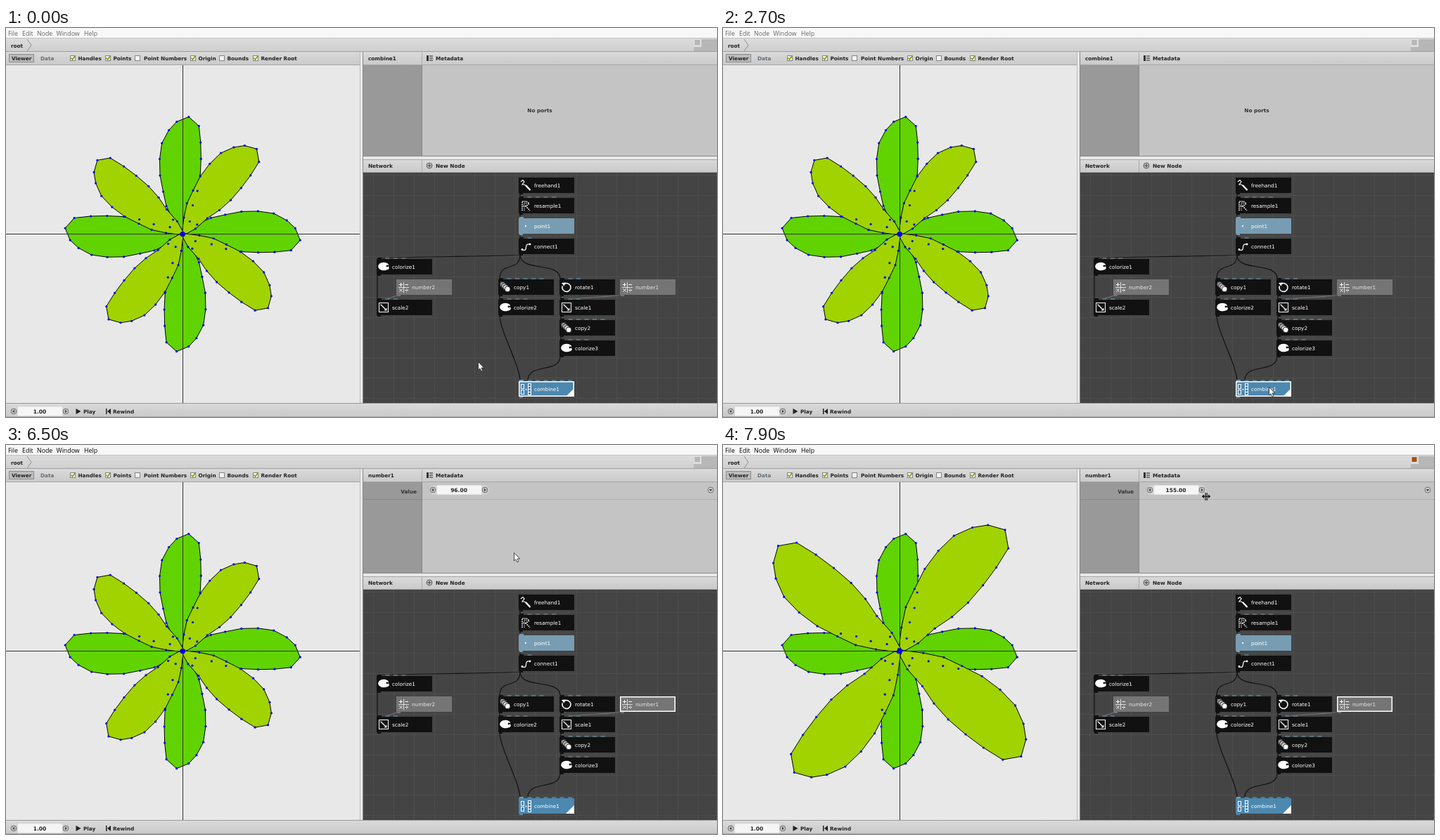
Recreate the animation shown at these times as an HTML page with a canvas. Size 1011 px wide and 554 px high, loop 8 s.

```html
<!DOCTYPE html>
<html lang="en">
<head>
<meta charset="utf-8">
<title>Node editor</title>
<style>
html, body { margin: 0; width: 100%; height: 100%; overflow: hidden; background: #d0d0d0; }
canvas { display: block; }
</style>
</head>
<body>
<canvas id="stage" width="1011" height="554"></canvas>
<script>
const g = document.getElementById('stage').getContext('2d');
const UI = '"DejaVu Sans", Verdana, sans-serif';
const MENU = '"Open Sans", "Noto Sans", sans-serif';

function box(x, y, w, h, color) { g.fillStyle = color; g.fillRect(x, y, w, h); }
function frame(x, y, w, h, color, lw = 1) {
  g.strokeStyle = color; g.lineWidth = lw;
  g.strokeRect(x + lw / 2, y + lw / 2, w - lw, h - lw);
}
function shade(x, y, w, h, top, bottom) {
  const s = g.createLinearGradient(0, y, 0, y + h);
  s.addColorStop(0, top); s.addColorStop(1, bottom);
  box(x, y, w, h, s);
}
function text(s, x, y, color = '#222', font = 'bold 7.3px ' + UI, align = 'left') {
  g.font = font; g.fillStyle = color; g.textAlign = align;
  g.fillText(s, x, y);
}
function path(points, stroke, lw = 1, fill) {
  g.beginPath();
  points.forEach(([x, y], i) => i ? g.lineTo(x, y) : g.moveTo(x, y));
  if (fill) { g.closePath(); g.fillStyle = fill; g.fill(); }
  if (stroke) { g.strokeStyle = stroke; g.lineWidth = lw; g.stroke(); }
}
function disc(x, y, r, fill, stroke, lw = 1) {
  g.beginPath(); g.arc(x, y, r, 0, 7);
  if (fill) { g.fillStyle = fill; g.fill(); }
  if (stroke) { g.strokeStyle = stroke; g.lineWidth = lw; g.stroke(); }
}

// keys: [time, value...], linear in between
function tween(keys, t) {
  let i = 0;
  while (i < keys.length - 1 && keys[i + 1][0] <= t) i++;
  const a = keys[i], b = keys[i + 1];
  if (!b || t <= a[0]) return a.slice(1);
  const p = (t - a[0]) / (b[0] - a[0]);
  return a.slice(1).map((v, k) => v + (b[k + 1] - v) * p);
}
const POINTER = [
  [300, 671, 475], [1500, 771, 519], [2100, 771, 519], [2700, 776, 511],
  [3700, 776, 511], [3900, 783, 474], [4100, 783, 474], [4300, 781, 471],
  [5100, 906, 361], [5300, 906, 367], [6100, 906, 367], [6500, 722, 153],
  [6900, 662, 80], [7300, 645, 64], [7500, 649, 64], [7900, 687, 73]
];
const VALUE = [[7300, 96, 0.96], [7500, 100, 0.967], [7900, 155, 1.367]];

// ---- flower ----
const CX = 251.2, CY = 293.6;
const PETAL = [
  [-2, -1], [-13.7, -20.6], [-23.2, -40.1], [-27.7, -60.6], [-32.2, -83.6], [-32.7, -107.1], [-29.5, -129.6],
  [-19.7, -148.1], [-8.5, -160.1], [8.6, -167.1], [23.1, -154.1], [25.6, -130.6], [26.1, -107.4],
  [25, -83.6], [21, -61.6], [14.3, -41.1], [10, -18.1], [2, 1]
];
function petals(startDeg, scale) {
  return [0, 90, 180, 270].map(turn => {
    const a = (startDeg + turn) * Math.PI / 180, c = Math.cos(a) * scale, s = Math.sin(a) * scale;
    return PETAL.map(([x, y]) => [CX + x * c - y * s, CY + x * s + y * c]);
  });
}
function viewer(scale) {
  box(0, 53, 503, 482, '#e8e8e8');
  const green = petals(0, 1), lime = petals(38, scale);
  green.forEach(p => path([...p, p[0]], '#000', 1, '#60d300'));
  lime.forEach(p => path([...p, p[0]], '#000', 1, '#a0d300'));
  box(251, 53, 1, 482, '#333');
  box(0, 293, 503, 1, '#333');
  [...green, ...lime].flat().forEach(([x, y]) => disc(x, y, 1.6, '#00f'));
}

// ---- bars and panels ----
function bar(x, y, w, h) {
  shade(x, y, w, h, '#dadada', '#c9c9c9');
  box(x, y + h - 1, w, 1, '#a6a6a6');
}
function check(x, label, on) {
  box(x, 39, 8, 8, '#f4f4f4');
  frame(x, 39, 8, 8, '#858585');
  if (on) path([[x + 1.5, 42.5], [x + 3.5, 45], [x + 7, 40]], '#82a000', 1.6);
  text(label, x + (label === 'Point Numbers' ? 13 : 11.5), 46);
}
function knob(x, y, dir) {
  disc(x, y, 4, '#bdbdbd', '#777');
  path([[x - dir, y - 2], [x - dir, y + 2], [x + 1.6 * dir, y]], null, 1, '#333');
}
function spinner(x, y, value) {
  g.beginPath(); g.roundRect(x, y - 6.5, 85, 13, 6.5);
  g.fillStyle = '#d6d6d6'; g.fill();
  box(x + 11, y - 6.5, 63, 13, '#f5f5f5');
  knob(x + 5, y, -1); knob(x + 79, y, 1);
  text(value.toFixed(2), x + 42, y + 3, '#222', 'bold 7.5px ' + UI, 'center');
}
function chrome(active, busy) {
  box(0, 0, 1011, 15, '#f7f7f7');
  [['File', 3], ['Edit', 23], ['Node', 44], ['Window', 71.5], ['Help', 111]].forEach(([s, x]) =>
    text(s, x, 10.5, active ? '#000' : '#666', '8.8px ' + MENU));
  shade(0, 15, 1011, 19, '#dcdcdc', '#cfcfcf');
  box(0, 14, 1011, 1, '#c0c0c0');
  box(0, 33, 1011, 1, '#9e9e9e');
  text('root', 7, 27.5);
  path([[30, 16], [36, 24.5], [30, 33]], '#8d8d8d');
  box(978, 16, 33, 17, '#b7b7b7');
  box(978, 16, 11, 11, '#dedede');
  box(980, 18, 6, 6, busy ? '#b54708' : '#b9b9b9');
  frame(979.5, 17, 7, 7, busy ? '#8a5a38' : '#a8a8a8', 0.8);

  bar(0, 34, 503, 19);
  box(4, 37, 36, 12, '#bcbcbc');
  frame(4, 37, 36, 12, '#8c8c8c');
  text('Viewer', 8, 46);
  text('Data', 49, 46, '#626d78');
  check(91, 'Handles', 1); check(141, 'Points', 1); check(183, 'Point Numbers', 0);
  check(262, 'Origin', 1); check(303, 'Bounds', 0); check(351, 'Render Root', 1);

  box(503, 34, 5, 501, '#e9e9e9');
  box(503, 34, 1, 501, '#bbb');
  box(507, 34, 1, 501, '#888');

  bar(0, 535, 1011, 19);
  box(0, 534, 1011, 1, '#999');
  spinner(6, 546, 1);
  path([[99.5, 542], [99.5, 550], [106.5, 546]], null, 1, '#222');
  text('Play', 110, 549);
  box(142, 542, 1.5, 8, '#222');
  path([[149, 542], [149, 550], [144, 546]], null, 1, '#222');
  text('Rewind', 152, 549);
}
function ports(selected, value) {
  bar(508, 34, 503, 19);
  box(591, 35, 1, 17, '#aaa');
  text(selected, 515, 46);
  box(598, 39, 3, 8, '#333');
  for (let y = 39; y < 47; y += 3) box(602, y, 5, 2, '#777');
  text('Metadata', 611, 46);
  box(508, 53, 84, 129, '#999');
  box(592, 53, 419, 129, '#c4c4c4');
  box(591, 53, 1, 129, '#858585');
  if (selected === 'number1') {
    text('Value', 584, 69, '#333', 'bold 7.3px ' + UI, 'right');
    spinner(602, 64, value);
    disc(1002, 64, 4, '#c9c9c9', '#777');
    path([[999.8, 63], [1004.2, 63], [1002, 65.8]], null, 1, '#333');
    box(508, 77, 84, 1, '#8b8b8b');
    box(592, 77, 419, 1, '#b0b0b0');
  } else {
    text('No ports', 759, 120, '#333', 'bold 7.3px ' + UI, 'center');
  }
  box(508, 182, 503, 5, '#e9e9e9');
  box(508, 182, 503, 1, '#8c8c8c');
  bar(508, 187, 503, 19);
  box(508, 187, 503, 1, '#a6a6a6');
  box(591, 188, 1, 17, '#aaa');
  text('Network', 515, 199);
  disc(602, 196, 3.9, '#c9c9c9', '#555');
  box(599.5, 195.5, 5, 1, '#333');
  box(601.5, 193.5, 1, 5, '#333');
  text('New Node', 611, 199);
}

// ---- node icons, drawn in a 16 x 18 cell ----
const W = '#fff';
const ICONS = {
  freehand() {
    path([[1, 4], [4, 1.5], [6, 4], [3, 8], [6, 8], [9, 10]], W, 1.2);
    path([[8, 9], [14.5, 16]], W, 2.4);
  },
  resample() {
    g.setLineDash([1.5, 1.2]);
    path([[3, 16], [3, 3], [9, 3], [13, 6], [9, 9.5], [3, 9.5]], W, 1.6);
    path([[8, 9.5], [14, 16]], W, 1.6);
    path([[6, 16], [6, 5], [9, 5.5], [9, 7.5]], W, 1);
    g.setLineDash([]);
  },
  point() { disc(8, 9, 1.2, '#e5f1f8'); },
  connect() {
    g.beginPath(); g.moveTo(3, 14);
    g.bezierCurveTo(13, 17, 4, 4, 14, 6);
    g.strokeStyle = W; g.lineWidth = 1.2; g.stroke();
    disc(3, 13.5, 1.4, W); disc(14, 6, 1.4, W);
  },
  colorize() {
    g.beginPath(); g.ellipse(8, 8.5, 7.8, 5.8, 0, 0.35, 5.95);
    g.lineTo(11, 8); g.closePath();
    g.fillStyle = W; g.fill();
    g.beginPath(); g.ellipse(11.5, 10.5, 4.2, 3, 0, 0, 7); g.fill();
    disc(13, 8, 1.4, '#111');
  },
  copy() {
    ['#999', '#bbb', '#ddd', W].forEach((c, i) => disc(4 + i * 2.4, 5 + i * 2.3, 3.9, c, '#111', 0.9));
  },
  rotate() {
    g.beginPath(); g.arc(8, 9.5, 6, -2, 3.5);
    g.strokeStyle = W; g.lineWidth = 1.6; g.stroke();
    path([[1, 3], [7, 2.5], [4.5, 7.5]], null, 1, W);
  },
  scale() {
    frame(1, 2, 14, 14, W);
    path([[3.5, 4.5], [11, 12]], W, 1.2);
    path([[12.5, 13.5], [12.5, 9.5], [8.5, 13.5]], null, 1, W);
  },
  number() {
    box(8, 2, 1, 15, '#ddd'); box(1, 9, 15, 1, '#ddd');
    path([[2, 5.5], [7, 5.5]], W); path([[4.5, 3], [4.5, 8]], W);
    path([[10.5, 5.5], [15, 5.5]], W);
    path([[2.5, 11.5], [6.5, 15.5]], W); path([[6.5, 11.5], [2.5, 15.5]], W);
    path([[10.5, 13.5], [15, 13.5]], W);
    box(12.3, 11, 1, 1, W); box(12.3, 15, 1, 1, W);
  },
  combine() {
    frame(1, 2, 5, 7, W); frame(1, 10, 5, 7, W);
    box(7.5, 9, 2, 1.5, W);
    for (let y = 1; y < 16; y += 4) frame(11, y, 5, 5, W);
  }
};

// name, x, y, number of input ports
const NODES = [
  ['freehand1', 729, 213, 0], ['resample1', 729, 242, 5], ['point1', 729, 271, 1],
  ['connect1', 729, 300, 2], ['colorize1', 527, 329, 4], ['number2', 555, 358, 0],
  ['scale2', 527, 387, 3], ['copy1', 700, 358, 6], ['colorize2', 700, 387, 4],
  ['rotate1', 787, 358, 3], ['number1', 873, 358, 0], ['scale1', 787, 387, 3],
  ['copy2', 787, 416, 6], ['colorize3', 787, 445, 4], ['combine1', 729, 503, 7]
];
function fillOf(kind) {
  return { point: '#789db3', number: '#757575', combine: '#4c88af' }[kind] || '#111';
}
function portColor(kind, first) {
  if (first) return kind === 'point' || kind === 'combine' ? '#789db3' : '#111';
  return kind === 'resample' || kind === 'colorize' ? '#686868' : '#587481';
}
function node([name, x, y, inputs], selected) {
  const kind = name.slice(0, -1), color = fillOf(kind);
  for (let i = 0; i < inputs; i++) box(x + 1 + i * 11.5, y - 2, 6, 2, portColor(kind, !i));
  box(x, y, 79, 22, color);
  box(x + 1, y + 22, 5, 2, color);
  if (kind === 'combine') path([[x + 79, y + 10], [x + 79, y + 22], [x + 67, y + 22]], null, 1, W);
  if (selected) frame(x, y, 79, 22, W, 1.5);
  g.save(); g.translate(x + 2, y + 2); ICONS[kind](); g.restore();
  text(name, x + 22, y + 13.7, kind === 'number' ? '#e6e6e6' : W, '7.3px ' + UI);
}
function link(x1, y1, x2, y2, bend, color = '#111') {
  g.beginPath(); g.moveTo(x1, y1);
  g.bezierCurveTo(x1, y1 + bend, x2, y2 - bend, x2, y2);
  g.strokeStyle = color; g.lineWidth = 1.2; g.stroke();
}
function network(selected) {
  box(508, 206, 503, 328, '#444');
  for (let x = 522; x < 1011; x += 28.86) box(Math.round(x), 206, 1, 328, '#4d4d4d');
  for (let y = 209; y < 534; y += 28.95) box(508, Math.round(y), 503, 1, '#4d4d4d');
  link(731, 323, 528, 328, 2);
  link(731, 323, 702, 357, 25);
  link(731, 323, 788, 357, 25);
  link(702, 409, 731, 503, 22);
  link(788, 467, 742, 502, 26);
  link(528, 351, 528, 387, 0);
  for (const x of [702, 789]) link(x, 380, x, 387, 0);
  for (const y of [235, 264, 293]) link(731, y, 731, y + 7, 0);
  for (const y of [409, 438]) link(789, y, 789, y + 7, 0);
  link(557, 380, 540, 387, 2, '#757575');
  link(875, 380, 800, 387, 2, '#757575');
  NODES.forEach(n => node(n, n[0] === selected));
}

function pointer(x, y, resize) {
  g.save(); g.translate(x, y);
  if (resize) {
    box(-1.5, -5, 1, 11, '#000'); box(0.7, -5, 1, 11, '#000');
    box(-5, -0.3, 10, 1, '#000');
    path([[-6, 0.2], [-3, -2.5], [-3, 2.9]], null, 1, '#000');
    path([[6.2, 0.2], [3.2, -2.5], [3.2, 2.9]], null, 1, '#000');
  } else {
    path([[0.5, 0.5], [0.5, 12], [3, 9.8], [4.8, 13.8], [6.8, 13], [5, 9], [8.6, 9], [0.5, 0.5]], '#222', 0.8, W);
  }
  g.restore();
}

function draw(now) {
  const t = Math.floor((now % 8000 + 100) / 200) * 200 - 100;
  const selected = t >= 5900 ? 'number1' : 'combine1';
  const [value, scale] = tween(VALUE, t);
  viewer(scale);
  chrome(t >= 3100, t === 3300 || t >= 7500);
  ports(selected, Math.round(value));
  network(selected);
  pointer(...tween(POINTER, t), t >= 7100);
}
let start;
function tick(now) {
  start ??= now;
  draw(now - start);
  requestAnimationFrame(tick);
}
draw(0);
requestAnimationFrame(tick);
</script>
</body>
</html>
```
